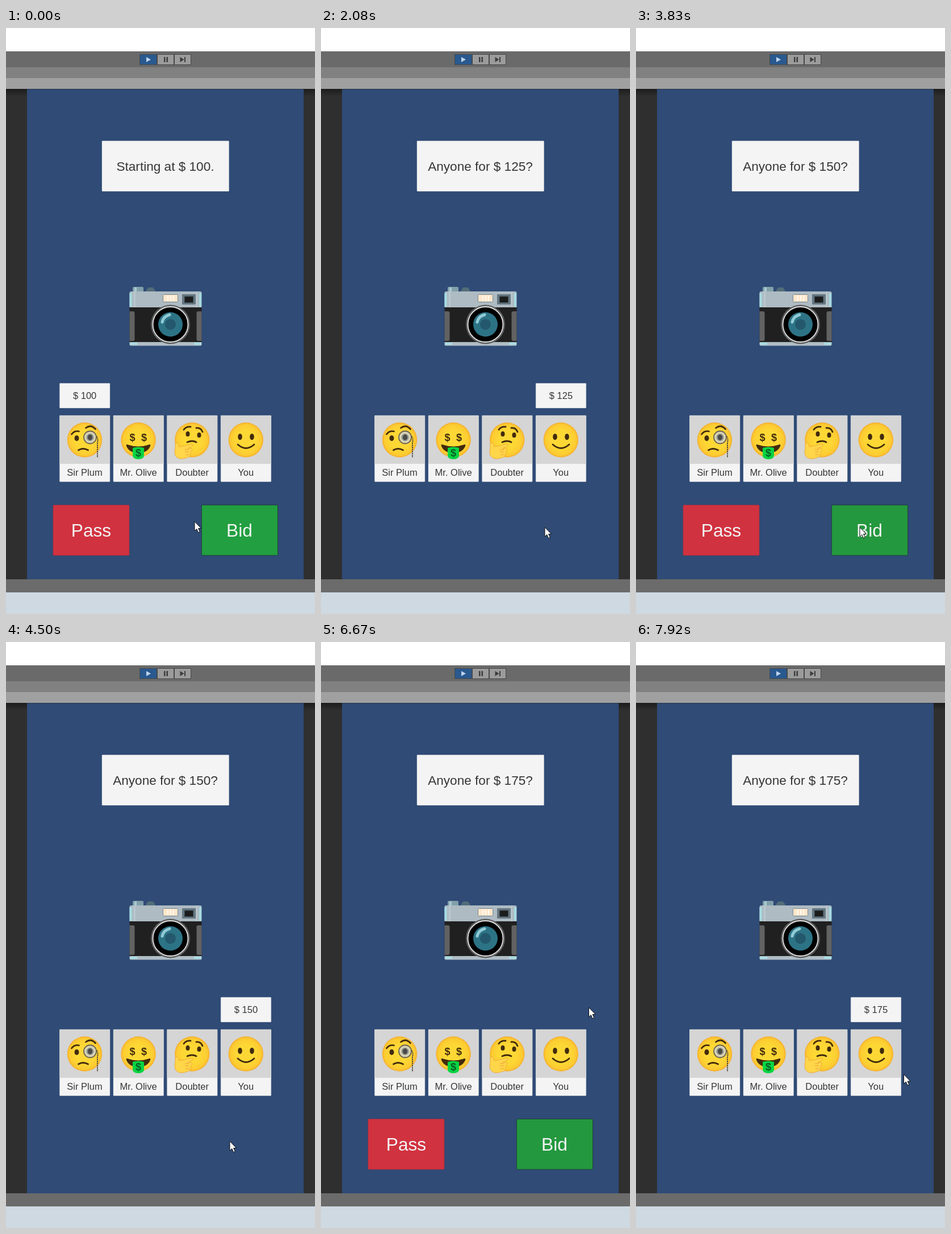
An HTML page for the animation above (8 s loop, 544 by 1030 pixels).

```html
<!DOCTYPE html>
<html lang="en">
<head>
<meta charset="utf-8">
<title>Auction game</title>
<style>
html, body { margin: 0; width: 100%; height: 100%; overflow: hidden; background: #fff; }
svg { display: block; width: 544px; height: 1030px; }
text { font: 16.5px "Liberation Sans", Arial, sans-serif; fill: #363636; text-anchor: middle; }
.title { font-size: 22.6px; }
.button text { font-size: 31.7px; fill: #f4f4f4; }
.line { fill: none; stroke: #422b0d; stroke-width: 2.8; stroke-linecap: round; stroke-linejoin: round; }
.ink { fill: #422b0d; }
.panel { fill: #f4f4f4; stroke: #d5d8dd; stroke-width: .4; }
.dollar { font-weight: bold; font-size: 18px; fill: #422b0d; }
</style>
</head>
<body>
<svg viewBox="0 0 544 1030">
  <defs>
    <radialGradient id="skin">
      <stop offset=".5" stop-color="#fdd835"/>
      <stop offset=".88" stop-color="#fccb31"/>
      <stop offset="1" stop-color="#f5ad2e"/>
    </radialGradient>
    <linearGradient id="shade" x2="0" y2="1">
      <stop stop-color="#1c1c1c"/>
      <stop offset="1" stop-color="#2f2f2f"/>
    </linearGradient>
  </defs>

  <!-- Editor window -->
  <rect width="544" height="41" fill="#fff"/>
  <rect y="41" width="544" height="28" fill="#6a6a6a"/>
  <rect y="69" width="544" height="19" fill="#818181"/>
  <rect y="88" width="544" height="19" fill="#a0a0a0"/>
  <rect y="107" width="544" height="862" fill="#2f2f2f"/>
  <rect y="107" width="544" height="13" fill="url(#shade)"/>
  <rect x="37" y="107.500" width="487" height="861.500" fill="#2f4b76"/>
  <rect y="969" width="544" height="23" fill="#6b6b6b"/>
  <rect y="992" width="544" height="38" fill="#cfd9e2"/>
  <rect x="235" y="46" width="91" height="19" fill="#484848"/>
  <rect x="236" y="47" width="29" height="17" fill="#29598f"/>
  <path d="M267 47h28v17h-28zM297 47h28v17h-28z" fill="#9b9b9b"/>
  <path d="M247 51v9l8-4.500z" fill="#bed3ea"/>
  <path d="M278 51h2.500v9H278zM282.500 51h2.500v9h-2.500zM306.500 51v9l7-4.500zM314 51h2v9h-2z" fill="#3d3d3d"/>

  <rect class="panel" x="169" y="198.500" width="223.500" height="88.500" rx="1"/>
  <text id="title" class="title" x="280.500" y="251"></text>

  <!-- Camera -->
  <g>
    <path d="M223 465v-8q0-2 2-2h15q2 0 2 2v8z" fill="#82a0aa"/>
    <path d="M226 456h4v8h-4z" fill="#a9cad0"/>
    <path d="M246.500 465v-4l4-5h8l4 5v4z" fill="#526d79"/>
    <rect x="217.500" y="489" width="127" height="64" fill="#202020"/>
    <path d="M217.500 491v-25q0-3 3-3h121q3 0 3 3v25z" fill="#aebbc3"/>
    <path d="M217.500 466h4v24h-4zM340 466h4v24h-4z" fill="#a5dbe2"/>
    <path d="M225 463h3v28h-3zM334.500 463h2v28h-2z" fill="#bac7ce"/>
    <path d="M217.500 498h6q3 0 3 3v46q0 3-3 3h-6zM344.500 498h-6q-3 0-3 3v46q0 3 3 3h6z" fill="#626262"/>
    <path d="M217.500 552h127v4q0 2.500-2.500 2.500H220q-2.500 0-2.500-2.500z" fill="#afbdc4"/>
    <path d="M218 553h13v4h-13zM331 553h13v4h-13z" fill="#a8dde3"/>
    <rect x="276.500" y="468.500" width="26" height="13" rx="1" fill="#ffe7cc" stroke="#78878e"/>
    <path d="M285 470v10M290 470v10M295 470v10" stroke="#fff9ed" stroke-width="2"/>
    <rect x="310" y="468" width="24" height="18" rx="1" fill="#657680"/>
    <rect x="314.500" y="472" width="15" height="10.500" fill="#1c1c1c" stroke="#34434b"/>
    <circle cx="289.500" cy="521" r="34.500" fill="#5e5e5e"/>
    <circle cx="289.500" cy="521" r="31" fill="#000" stroke="#e4e4e4" stroke-width="1.800"/>
    <circle cx="289.500" cy="521" r="21.500" fill="#2d7386"/>
    <circle cx="289.500" cy="521" r="9.500" fill="#24586c"/>
    <path d="M275 517q2-10 13-13" fill="none" stroke="#91cbd5" stroke-width="5" stroke-linecap="round"/>
  </g>

  <g id="cards"></g>

  <!-- Expressions, each relative to the centre of its face -->
  <g transform="translate(138.500 724)">
    <path class="line" d="M-23-10q5-7 13-5M2-21q9-7 17 2"/>
    <ellipse class="ink" cx="-14" cy="-3" rx="4" ry="5"/>
    <circle cx="9.500" cy="-4.500" r="11" fill="#d9d2b4" stroke="#6d6650" stroke-width="1.800"/>
    <circle cx="9.500" cy="-4.500" r="6.500" fill="#8b9592"/>
    <ellipse cx="9.500" cy="-4.500" rx="4" ry="5" fill="#4b4a46"/>
    <path d="M21-6q3 3 1.500 11V31" fill="none" stroke="#4d4538" stroke-width="2" stroke-dasharray="2.500 1.200"/>
    <path class="line" d="M-11 18q8-5 17 0"/>
  </g>
  <g transform="translate(233 724)">
    <text class="dollar" x="-10.500" y="2">$</text>
    <text class="dollar" x="10" y="2">$</text>
    <path class="ink" d="M-20 8q20 7 40 0q2 0 1 3q-5 12-21 12t-21-12q-1-3 1-3z"/>
    <path d="M-10 14q10-3 20 0v13q0 7-10 7t-10-7z" fill="#08d442"/>
    <text class="dollar" y="29" style="fill:#075f27">$</text>
  </g>
  <g transform="translate(328 724)">
    <path class="line" d="M-15-18q4-6 12-5M7-21q8-1 11 7M-9 4q9-4 16 0"/>
    <ellipse class="ink" cx="-8" cy="-10.500" rx="3.500" ry="4.600"/>
    <ellipse class="ink" cx="12" cy="-8.500" rx="3.500" ry="4.600"/>
    <path d="M-30 13q-1-8 3-8q3 0 4 7q12-2 21-5q4 0 3 3q-1 2-9 5q7-1 8 2q0 3-3 4q2 3-1 5q1 4-8 6q-13 4-18-5q-2-5 0-14z" fill="#ffd54a" stroke="#eea12f" stroke-width=".8"/>
    <path d="M-13 17h7M-13 21h7M-12 26h6" fill="none" stroke="#eba033"/>
  </g>
  <g transform="translate(422.500 724)">
    <ellipse class="ink" cx="-10.500" cy="-5.500" rx="3.800" ry="5.500"/>
    <ellipse class="ink" cx="10.500" cy="-5.500" rx="3.800" ry="5.500"/>
    <path class="line" d="M-14.500 8q14.500 13 29 0"/>
  </g>

  <g id="bubble">
    <rect class="panel" y="624.500" width="88.500" height="43.500" rx="1"/>
    <text id="amount" x="44.250" y="652"></text>
  </g>

  <g id="buttons" class="button">
    <rect x="83" y="838.500" width="134" height="88.500" rx="1.500" fill="#d1323f" stroke="#a02f42" stroke-width=".8"/>
    <text x="150" y="893.500">Pass</text>
    <rect id="bid" x="344.500" y="838.500" width="134" height="88.500" rx="1.500" stroke="#1d4238"/>
    <text x="411" y="893.500">Bid</text>
  </g>

  <path id="cursor" d="M.5.500v16.500l3.800-3.500 2.700 6.200 2.800-1.200-2.700-6h5z" fill="#fff" stroke="#111"/>
</svg>
<script>
const $ = id => document.getElementById(id);
const LOOP = 8000, STEP = 250 / 3;
const cardX = seat => 94.4 + 94.6 * seat;

$('cards').innerHTML = ['Sir Plum', 'Mr. Olive', 'Doubter', 'You'].map((name, seat) => `
  <g transform="translate(${cardX(seat)} 681)">
    <rect class="panel" width="88.500" height="116.500" rx="1"/>
    <rect width="88.500" height="85" fill="#d5d5d5"/>
    <circle cx="44.100" cy="43" r="30.700" fill="url(#skin)"/>
    <text x="44.100" y="106">${name}</text>
  </g>`).join('');

// [start, end, seat, amount]
const bids = [
  [0, 415, 0, 100],
  [1415, 2165, 3, 125], [2415, 3165, 1, 125],
  [4250, 5000, 3, 150], [5250, 6000, 1, 150],
  [7750, LOOP, 3, 175]
];
// [start, price]
const calls = [[665, 125], [3415, 150], [6250, 175]];
// [shown, hidden, pressed]
const turns = [[0, 1415, 1165], [3415, 4250, 4080], [6250, 7750, 7580]];
// [time, x, y]
const path = [
  [0, 331.5, 867], [80, 331.5, 867], [500, 393.5, 877], [5330, 393.5, 877],
  [5920, 471, 720], [6420, 471, 642], [6920, 471, 642],
  [7420, 471, 862], [7740, 471, 862], [7910, 471, 759.5]
];

const during = (spans, t) => spans.find(([from, to]) => t >= from && t < to);

function cursorAt(t) {
  const next = path.findIndex(key => key[0] > t);
  if (next < 0) return path.at(-1).slice(1);
  const a = path[next - 1], b = path[next];
  const k = (t - a[0]) / (b[0] - a[0]), ease = k * k * (3 - 2 * k);
  return [1, 2].map(i => a[i] + (b[i] - a[i]) * ease);
}

function bidColour(t, pressed, x, y) {
  if (t >= pressed) {
    const k = Math.min(1, (t - pressed) / 80);
    return `rgb(${36 - 6 * k},${152 - 24 * k},${62 - 13 * k})`;
  }
  const hover = x > 344 && x < 478 && y > 838 && y < 927;
  const selected = t > bids[1][0];
  return hover || selected ? '#24983e' : '#229f40';
}

function draw(t) {
  const call = calls.findLast(([from]) => t >= from);
  $('title').textContent = call ? `Anyone for $ ${call[1]}?` : 'Starting at $ 100.';

  const bid = during(bids, t);
  $('bubble').style.display = bid ? '' : 'none';
  if (bid) {
    $('bubble').setAttribute('transform', `translate(${cardX(bid[2])} 0)`);
    $('amount').textContent = `$ ${bid[3]}`;
  }

  const [x, y] = cursorAt(t);
  const turn = during(turns, t);
  $('buttons').style.display = turn ? '' : 'none';
  if (turn) $('bid').setAttribute('fill', bidColour(t, turn[2], x, y));
  $('cursor').setAttribute('transform', `translate(${x} ${y})`);
}

function tick() {
  const t = performance.now() % LOOP;
  draw(Math.floor((t + 5) / STEP) * STEP % LOOP);
  requestAnimationFrame(tick);
}
tick();
</script>
</body>
</html>
```
